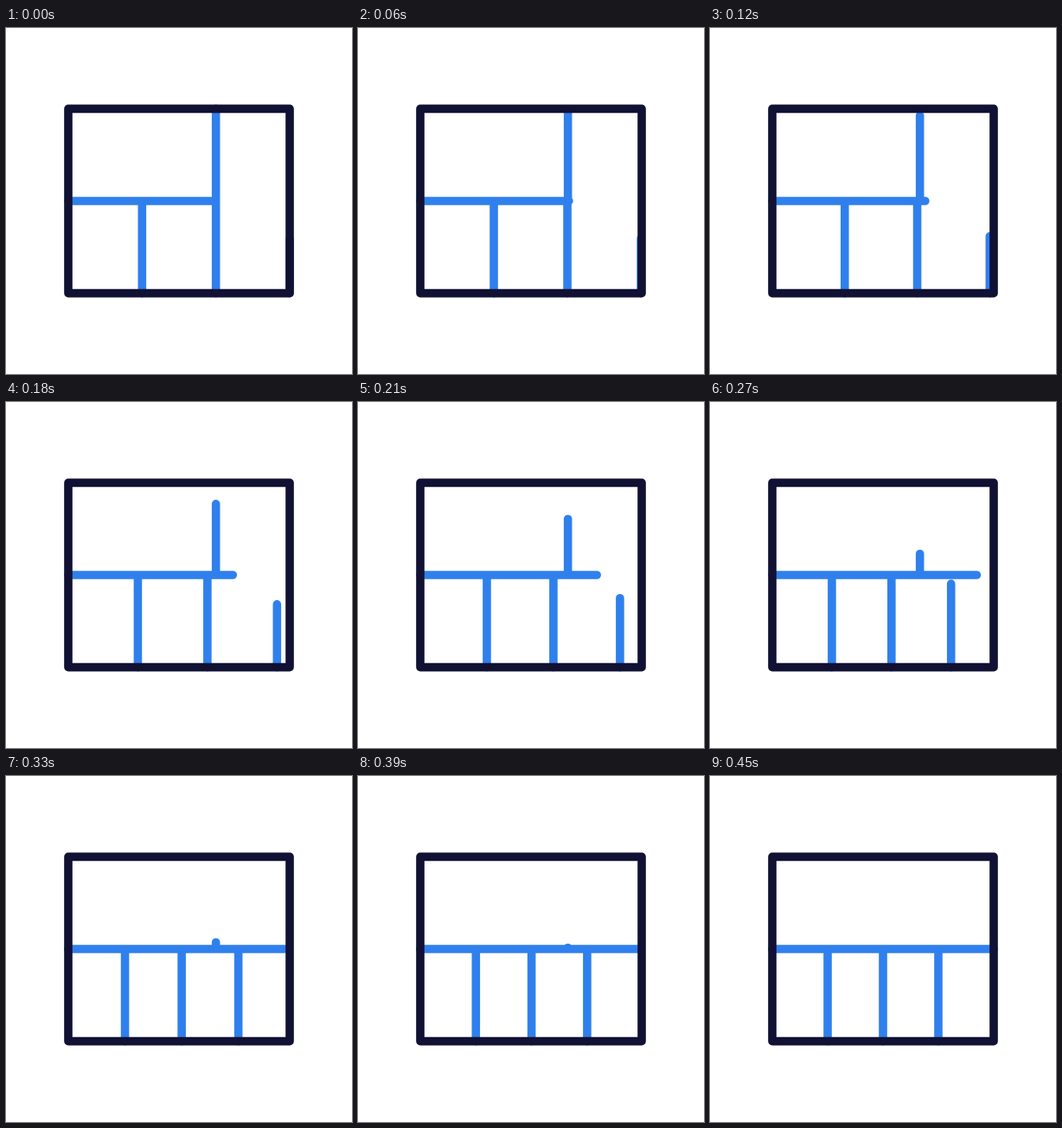
An HTML page that plays this animation: 400x400 px, repeating every 0.48 s.

```html
<!DOCTYPE html>
<html lang="en">
<head>
<meta charset="utf-8">
<title>Layout morph</title>
<style>
  html, body { margin: 0; height: 100%; overflow: hidden; background: #fff; }
  svg { display: block; width: 100%; height: 100%; }
</style>
</head>
<body>
<svg viewBox="0 0 400 400" fill="none" stroke-width="9.6" stroke-linecap="round" stroke-linejoin="round">
  <path id="dividers" stroke="#2f80ed"/>
  <rect x="72" y="93.33" width="256" height="213.34" stroke="#111134"/>
</svg>
<script>
  const LOOP = 480, STEP = 30, LAST = LOOP / STEP - 1;
  const TOP = 93.33, MIDDLE = 200, BOTTOM = 306.67;
  const dividers = document.getElementById('dividers');
  const mix = (from, to, p) => from + (to - from) * p;

  // cubic-bezier(.7, 0, .3, 1), solved by bisection
  function ease(x) {
    let low = 0, high = 1;
    for (let i = 0; i < 30; i++) {
      const s = (low + high) / 2, r = 1 - s;
      if (2.1 * r * r * s + 0.9 * r * s * s + s * s * s < x) low = s;
      else high = s;
    }
    return low * low * (3 - 2 * low);
  }

  const vertical = (x, y1, y2) => `M${x} ${y1}V${y2}`;

  function draw(time) {
    const p = ease(Math.floor(time % LOOP / STEP) / LAST);
    dividers.setAttribute('d', [
      `M72 ${MIDDLE}H${mix(242.67, 328, p)}`,
      vertical(242.67, mix(TOP, MIDDLE, p), MIDDLE),
      vertical(mix(157.33, 136, p), MIDDLE, BOTTOM),
      vertical(mix(242.67, 200, p), MIDDLE, BOTTOM),
      vertical(mix(328, 264, p), mix(244, MIDDLE, p), BOTTOM)
    ].join(''));
  }

  const start = performance.now();
  function tick() {
    draw(performance.now() - start);
    requestAnimationFrame(tick);
  }
  tick();
</script>
</body>
</html>
```
